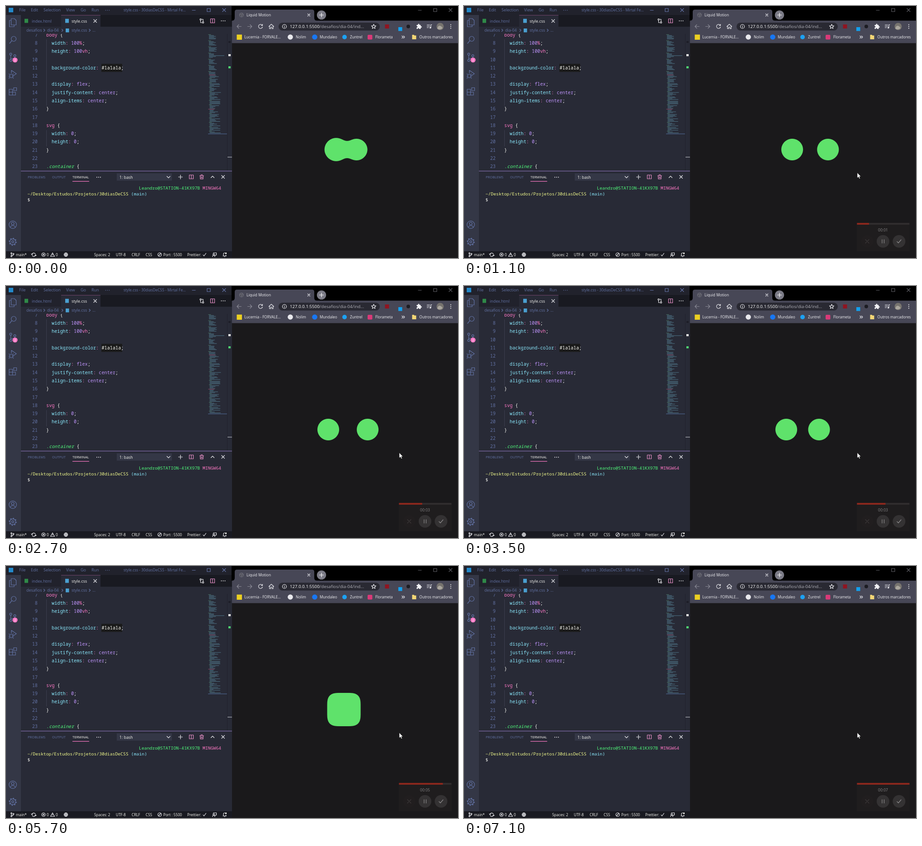
These frames come from a looping animation (1000x560 px, 7.2 s). An HTML page:

```html
<!DOCTYPE html>
<html lang="pt">
<head>
<meta charset="utf-8">
<title>Liquid Motion</title>
<style>
html, body { margin: 0; width: 100%; height: 100%; overflow: hidden; background: #000; }
svg { display: block; width: 1000px; height: 560px; }
text { font-family: "Open Sans", "Noto Sans", sans-serif; white-space: pre; }
.code text, .term text { font-family: "Noto Sans Mono", "DejaVu Sans Mono", monospace; font-weight: 500; fill: #f8f8f2; }
.code text { font-size: 10.22px; }
.code .num { fill: #6272a4; text-anchor: end; font-weight: 400; }
.term text { font-size: 9.8px; }
.code .pk, .term .pk { fill: #ff79c6; }
.code .cy, .term .cy { fill: #8be9fd; }
.code .pu { fill: #bd93f9; }
.code .gr, .term .gr { fill: #50fa7b; }
.term .ye { fill: #f1fa8c; }
.it { font-style: italic; }
.menu { font-size: 9px; fill: #6272a4; }
.tab { font-size: 8.9px; }
.panel { font-size: 7.6px; fill: #6272a4; }
.status { font-size: 8.2px; fill: #f8f8f2; }
.mark { font-size: 8.2px; fill: #f1f1f4; }
.ico { fill: none; stroke-width: 1.2; stroke-linecap: round; stroke-linejoin: round; }
.dim { stroke: #6272a4; }
.lit { stroke: #e8e8ec; }
.rose { stroke: #e58fc6; }

#left, #right, #box, #bar, #secs, #hud { animation: 7.2s infinite linear; }
#left { animation-name: left; }
#right { animation-name: right; }
#box { animation-name: box; transform-box: fill-box; transform: translate(-50%, -50%); }
#bar { animation-name: bar; }
#secs { animation-name: secs; animation-timing-function: step-end; }
#hud { animation-name: hud; animation-timing-function: step-end; }

@keyframes left {
  0% { transform: translateX(730.5px); r: 25.8px; }
  6.94% { transform: translateX(734px); r: 24px; animation-timing-function: ease-in-out; }
  26.4%, 48.6% { transform: translateX(713px); r: 24px; animation-timing-function: ease-in-out; }
  56% { transform: translateX(747.6px); r: 24px; }
  65%, 100% { transform: translateX(747.6px); r: 0px; }
}
@keyframes right {
  0% { transform: translateX(775.5px); }
  6.94% { transform: translateX(787.5px); animation-timing-function: ease-out; }
  27.8% { transform: translateX(818.5px); animation-timing-function: ease-in-out; }
  46%, 48.6% { transform: translateX(785.5px); r: 24px; animation-timing-function: ease-in-out; }
  56% { transform: translateX(747.6px); r: 24px; }
  65%, 100% { transform: translateX(747.6px); r: 0px; }
}
@keyframes box {
  0%, 54% { width: 0; height: 0; rx: 0px; }
  55.5% { width: 46px; height: 46px; rx: 23px; animation-timing-function: ease-out; }
  68.05% { width: 70.5px; height: 70.5px; rx: 27px; }
  79.2%, 87% { width: 71.4px; height: 71.4px; rx: 13px; animation-timing-function: ease-in; }
  96%, 100% { width: 0; height: 0; rx: 0px; }
}
@keyframes bar {
  0% { width: 9px; }
  6.94% { width: 17px; }
  27.8% { width: 41px; }
  48.6% { width: 63px; }
  68.05% { width: 86px; }
  79.2% { width: 97px; }
  98.6%, 100% { width: 116px; }
}
@keyframes secs {
  0% { transform: translateY(0); }
  21.9% { transform: translateY(-20px); }
  37.2% { transform: translateY(-40px); }
  52.6% { transform: translateY(-60px); }
  67.6% { transform: translateY(-80px); }
  83.3% { transform: translateY(-100px); }
  98%, 100% { transform: translateY(-120px); }
}
@keyframes hud {
  0% { opacity: 0; }
  2.7%, 100% { opacity: 1; }
}
</style>
</head>
<body>
<svg viewBox="0 0 1000 560">
<defs>
  <filter id="goo" filterUnits="userSpaceOnUse" x="640" y="240" width="250" height="160" color-interpolation-filters="sRGB">
    <feGaussianBlur stdDeviation="8"/>
    <feColorMatrix values="0 0 0 0 .373  0 0 0 0 .886  0 0 0 0 .42  0 0 0 20 -8.2"/>
  </filter>
  <clipPath id="codeClip"><rect x="33" y="62" width="467" height="304"/></clipPath>
  <clipPath id="secClip"><rect x="900" y="489" width="54" height="17"/></clipPath>
</defs>

<!-- editor -->
<rect width="500" height="560" fill="#282a36"/>
<rect width="500" height="20" fill="#21222c"/>
<rect y="20" width="33" height="525" fill="#343746"/>
<rect x="33" y="20" width="467" height="26" fill="#191a21"/>
<rect x="33" y="20" width="89" height="26" fill="#21222c"/>
<rect x="122" y="20" width="87" height="27" fill="#282a36"/>
<rect x="122" y="20" width="87" height="1" fill="#70446a"/>
<rect y="545" width="500" height="15" fill="#191a21"/>

<rect x="6" y="4" width="10" height="10" fill="#2489ca"/>
<g class="menu">
  <text x="29" y="12.3">File</text><text x="55" y="12.3">Edit</text><text x="83" y="12.3">Selection</text>
  <text x="133" y="12.3">View</text><text x="165" y="12.3">Go</text><text x="189" y="12.3">Run</text>
  <text x="260" y="12.3" font-size="8.4">style.css - 30diasDeCSS - Mirtal Fe...</text>
</g>
<g fill="#6272a4"><circle cx="220.500" cy="9.500" r=".8"/><circle cx="224.500" cy="9.500" r=".8"/><circle cx="228.500" cy="9.500" r=".8"/></g>
<path class="ico dim" d="M412 9.500h7M445 5.500h7v7h-7zM479 5.500l7 7m0-7l-7 7" stroke-width="1"/>

<rect x="41" y="28.500" width="8" height="9" fill="#2f8a48"/>
<text class="tab" x="57" y="36.500" fill="#6272a4">index.html</text>
<rect x="131" y="28.500" width="8" height="9" fill="#4a9fd0"/>
<text class="tab" x="145" y="36.500" fill="#f8f8f2">style.css</text>
<path class="ico lit" d="M194 30l6.500 6.500m0-6.500l-6.500 6.500"/>
<g class="ico lit"><circle cx="430.500" cy="30" r="1.600"/><circle cx="436" cy="36.500" r="1.600"/><path d="M430.500 32v5h3M436 34.500v-5h-3"/></g>
<path class="ico rose" d="M452.500 28.500h9v9h-9zM457 28.500v9"/>
<g fill="#e8e8ec"><circle cx="476.500" cy="33" r="1"/><circle cx="480.500" cy="33" r="1"/><circle cx="484.500" cy="33" r="1"/></g>
<g class="tab" fill="#6272a4">
  <text x="45" y="57.300">desafios</text><text x="91" y="57.300">dia-04</text>
  <text x="145" y="57.300">style.css</text><text x="191" y="57.300">...</text>
</g>
<path class="ico dim" d="M83.500 51.500l2.500 2.500-2.500 2.500M123.500 51.500l2.500 2.500-2.500 2.500M184 51.500l2.500 2.500-2.500 2.500" stroke-width="1"/>
<rect x="132" y="50" width="7.500" height="8.500" fill="#4a9fd0"/>

<!-- activity bar -->
<g class="ico dim" stroke-width="1.300">
  <path d="M11.500 28h7l4 4v10h-11zM11.500 32h-4v14h10.500v-4"/>
  <circle cx="17" cy="73" r="5.500"/><path d="M13 77l-5 6"/>
  <circle cx="10.500" cy="107" r="2.300"/><circle cx="10.500" cy="121" r="2.300"/><circle cx="19.500" cy="110.500" r="2.300"/><path d="M10.500 109.500v9M19.500 113q0 3.500-4 3.500h-2.500q-2.500 0-2.500 2"/>
  <path d="M12 143l11 7.500-7 4.500M12 143v6"/><ellipse cx="11.500" cy="155.500" rx="3.300" ry="4"/><path d="M8 152l-1.500-1M15 152l1.500-1M7.500 156h-1.500M17 156h-1.500M8 159l-1.500 1.500M15 159l1.500 1.500"/>
  <path d="M7 185h7.500v13h-7.500zM7 191.500h14v6.500h-7M17 181.500h6.500v6.500h-6.500z"/>
  <circle cx="15" cy="486" r="8.300"/><circle cx="15" cy="483.500" r="3"/><path d="M9.500 492q1-4 5.500-4t5.500 4"/>
  <circle cx="15" cy="524" r="6.300"/><circle cx="15" cy="524" r="2.300"/><circle cx="15" cy="524" r="7.600" stroke-width="2.200" stroke-dasharray="2.500 3.470" stroke-linecap="butt"/>
</g>
<circle cx="20" cy="120" r="5.600" fill="#ff79c6"/>
<text x="20" y="122.600" font-size="7" fill="#fff" text-anchor="middle">2</text>

<!-- code -->
<g class="code" clip-path="url(#codeClip)">
  <path d="M89.500 74v148M89.500 276v36" stroke="#3b3e4e"/>
  <rect x="211" y="128.500" width="46" height="18" fill="#1a1a1a"/>
  <g id="nums"></g>
  <text x="89" y="67.700"><tspan class="pk">body</tspan> {</text>
  <text x="101" y="86"><tspan class="cy">width</tspan><tspan class="pk">:</tspan> <tspan class="pu">100</tspan><tspan class="pk">%</tspan>;</text>
  <text x="101" y="104.300"><tspan class="cy">height</tspan><tspan class="pk">:</tspan> <tspan class="pu">100</tspan><tspan class="pk">vh</tspan>;</text>
  <text x="101" y="140.800"><tspan class="cy">background-color</tspan><tspan class="pk">:</tspan> #1a1a1a;</text>
  <text x="101" y="177.400"><tspan class="cy">display</tspan><tspan class="pk">:</tspan> <tspan class="pu">flex</tspan>;</text>
  <text x="101" y="195.700"><tspan class="cy">justify-content</tspan><tspan class="pk">:</tspan> <tspan class="pu">center</tspan>;</text>
  <text x="101" y="214"><tspan class="cy">align-items</tspan><tspan class="pk">:</tspan> <tspan class="pu">center</tspan>;</text>
  <text x="89" y="232.200">}</text>
  <text x="89" y="268.800"><tspan class="pk">svg</tspan> {</text>
  <text x="101" y="287.100"><tspan class="cy">width</tspan><tspan class="pk">:</tspan> <tspan class="pu">0</tspan>;</text>
  <text x="101" y="305.400"><tspan class="cy">height</tspan><tspan class="pk">:</tspan> <tspan class="pu">0</tspan>;</text>
  <text x="89" y="323.600">}</text>
  <text x="89" y="360.200"><tspan class="gr it">.container</tspan> {</text>
</g>
<g id="map" opacity=".7"></g>
<rect x="447" y="283.500" width="42" height="1.500" fill="#44597c"/>
<path d="M489.500 62v304" stroke="#20212b"/>
<rect x="492" y="78" width="5" height="4" fill="#1d1e27"/>
<rect x="492" y="107" width="5" height="4.500" fill="#f8f8f2"/>
<rect x="492" y="134" width="5" height="4.500" fill="#4fd873"/>
<rect x="490" y="335" width="10" height="1.500" fill="#9a9ba3"/>

<!-- terminal -->
<rect x="33" y="366.200" width="467" height="1.200" fill="#8570b0"/>
<g class="panel">
  <text x="48" y="383">PROBLEMS</text><text x="102" y="383">OUTPUT</text><text x="147" y="383" fill="#f8f8f2">TERMINAL</text>
</g>
<rect x="147" y="389" width="37" height="1.200" fill="#ff79c6"/>
<g fill="#e8e8ec"><circle cx="201" cy="380.500" r="1"/><circle cx="205" cy="380.500" r="1"/><circle cx="209" cy="380.500" r="1"/></g>
<rect x="245" y="372" width="122" height="16" fill="#343746"/>
<text class="tab" x="251" y="383.500" fill="#f8f8f2">1: bash</text>
<path class="ico lit" d="M356 378.500l3.500 3.500 3.500-3.500M381.500 380h9M386 375.500v9M453.500 381.500l3.500-3.500 3.500 3.500M477 376.500l6.500 6.500m0-6.500l-6.500 6.500"/>
<path class="ico rose" d="M405.500 375.500h9v8.500h-9zM410 375.500v8.500M428.500 377h9M431.500 376.500v-1.500h3v1.500M429.500 377.500l.500 7h6l.500-7M432 379.500v3M434 379.500v3"/>
<g class="term">
  <text x="294" y="407.500"><tspan class="gr">Leandro@STATION-41KX97B</tspan> <tspan class="pk">MINGW64</tspan></text>
  <text x="47.500" y="420.500"><tspan class="ye">~/Desktop/Estudos/Projetos/30diasDeCSS</tspan> <tspan class="cy">(main)</tspan></text>
  <text x="47.500" y="433.500">$</text>
</g>

<!-- status bar -->
<g class="status">
  <text x="22" y="556">main*</text><text x="90" y="556">0</text><text x="110" y="556">0</text>
  <text x="195" y="556">Spaces: 2</text><text x="243" y="556">UTF-8</text><text x="278" y="556">CRLF</text>
  <text x="309" y="556">CSS</text><text x="348" y="556">Port : 5500</text><text x="401" y="556">Prettier:</text>
</g>
<g class="ico lit" stroke-width="1">
  <circle cx="12" cy="549.500" r="1.300"/><circle cx="12" cy="556" r="1.300"/><circle cx="16.500" cy="551" r="1.300"/><path d="M12 551v3.500M16.500 552.500q0 2-4.500 2"/>
  <path d="M57.500 552a4 4 0 0 1 7.500-1M65.500 553.500a4 4 0 0 1-7.500 1M56 551l1.500 1.500 1.500-1.500M64 554.500l1.500-1.500 1.500 1.500"/>
  <circle cx="83" cy="552.500" r="4"/><path d="M81.500 551l3 3m0-3l-3 3M103 548.500l4.500 8h-9zM103 551.500v2"/>
  <circle cx="132.500" cy="552.500" r="4"/><path d="M128.500 552.500h8M132.500 548.500v8"/><ellipse cx="132.500" cy="552.500" rx="2" ry="4"/>
  <circle cx="340" cy="552.500" r="4"/><path d="M337.500 555.500l5-6M436 553l2 2.500 4.500-6"/>
  <circle cx="459.500" cy="552" r="1.700"/><path d="M457 557q0-3 2.500-3t2.500 3M458.500 548.500h7v5h-2l-1.500 1.500"/>
  <path d="M480 555.500h7.500M481 555v-3.500q0-3 3-3M486.500 555v-2M483 557h1.500"/>
</g>
<circle cx="486.500" cy="549.500" r="1.800" fill="#f8f8f2"/>

<!-- browser -->
<rect x="500" width="500" height="560" fill="#1a191b"/>
<rect x="499" width="501" height="33" fill="#000"/>
<path d="M500 32.500q6 0 6-6V13q0-5 5-5h166q5 0 5 5v13.500q0 6 6 6h312v50H500z" fill="#474756"/>
<g class="ico" stroke="#6c6c78"><circle cx="521" cy="20" r="4.500" fill="#50505a"/><path d="M517 18.500h3l2 2-1 3.500M523 16v2l2 1.500"/></g>
<text x="532" y="23" font-size="8.400" fill="#f1f1f4">Liquid Motion</text>
<path class="ico lit" d="M667.500 17.500l5 5m0-5l-5 5"/>
<circle cx="698" cy="20" r="10.300" fill="#7a7a85"/>
<path class="ico" stroke="#fff" d="M693.500 20h9M698 15.500v9"/>
<path class="ico" stroke="#5a5a60" stroke-width="1" d="M912 9.500h7M946 5.500h7v7h-7zM980 5.500l7 7m0-7l-7 7"/>
<rect x="603" y="37" width="224" height="17.500" rx="8.700" fill="#292932"/>
<path class="ico" stroke="#8a8a95" d="M520.500 45.500h-9M515 41.500l-4 4 4 4M534.500 45.500h9M540 41.500l4 4-4 4" stroke-width="1.400"/>
<g class="ico lit" stroke-width="1.400">
  <path d="M567 43a4.500 4.500 0 1 0 .500 3.500M567.500 40.500v3h-3"/>
  <path d="M581.500 45.500l5.500-5 5.500 5M583 44.500v6h2.500v-3.500h3v3.500h2.500v-6"/>
</g>
<g class="ico lit" stroke-width="1"><circle cx="616" cy="45.500" r="4.500"/><path d="M616 45v3M616 43v.200"/>
<path d="M813.500 40.500l1.400 3.400 3.600.300-2.800 2.300.900 3.600-3.100-2-3.100 2 .900-3.600-2.800-2.300 3.600-.300z"/></g>
<text x="628" y="49" font-size="9.700" fill="#fff">127.0.0.1:5500<tspan fill="#b0b0b8">/desafios/dia-04/ind...</tspan></text>
<rect x="838.500" y="41" width="9" height="9" fill="#8f1420"/>
<rect x="868" y="47" width="8.500" height="8.500" fill="#12a0ee"/>
<circle cx="890" cy="45.500" r="4" fill="#1c1c22"/>
<path d="M908.500 42h3q-.500-2.500 1.500-2.500t1.500 2.500h3v3q2.500-.300 2.500 1.500t-2.500 1.500v3h-3.500q0-2-1.500-2t-1.500 2h-2.500v-3.500q2 0 2-1.500t-2-1.500z" fill="#f1f1f4"/>
<path class="ico lit" d="M931.500 42h6M931.500 45h6M931.500 48h3.500M940 48v-6.500h2"/><circle cx="938.800" cy="48.300" r="1.700" fill="#e8e8ec"/>
<circle cx="960.500" cy="45.500" r="8" fill="#77746f"/><path d="M954 50q2-7 6-6t6 5a8 8 0 0 1-12 1z" fill="#aaa69e"/>
<g fill="#e8e8ec"><circle cx="984" cy="41.500" r="1.100"/><circle cx="984" cy="45.500" r="1.100"/><circle cx="984" cy="49.500" r="1.100"/></g>
<rect x="510.500" y="63.500" width="11.500" height="11.500" fill="#ecd021"/>
<circle cx="629" cy="69" r="5.800" fill="#e8e8ec"/>
<circle cx="683" cy="69" r="5.800" fill="#1877f2"/>
<circle cx="749" cy="69" r="5" fill="#1da1f2"/>
<rect x="800" y="64" width="10.500" height="10.500" rx="2" fill="#d93a78"/>
<path d="M898.500 64h4l1 1.500h4v8.500h-9z" fill="#f2d675"/>
<g class="mark">
  <text x="527.500" y="72">Lucernia - FORVALE...</text><text x="641" y="72">Nolim</text><text x="694" y="72">Mundaleo</text>
  <text x="761" y="72">Zuntrel</text><text x="817" y="72">Florameta</text><text x="914.500" y="72">Outros marcadores</text>
</g>
<path class="ico lit" d="M876 66.500l2.500 2.500-2.500 2.500M879.500 66.500l2.500 2.500-2.500 2.500"/>

<!-- liquid -->
<g filter="url(#goo)" fill="#5fe26b">
  <circle id="left" cy="319" r="24"/>
  <circle id="right" cy="319" r="24"/>
  <rect id="box" x="747.600" y="319"/>
</g>

<!-- recorder and pointer -->
<g id="hud">
  <rect x="869" y="482" width="117" height="63" fill="#1f1d1e"/>
  <rect x="869.500" y="482" width="116" height="4" fill="#302d2e"/>
  <rect id="bar" x="869.500" y="482" height="4" fill="#8a271d"/>
  <g clip-path="url(#secClip)"><g id="secs" font-size="8.600" fill="#858384" text-anchor="middle"></g></g>
  <circle cx="892" cy="523" r="14" fill="#211e1f"/>
  <circle cx="927" cy="523" r="14" fill="#343233"/><circle cx="962.500" cy="523" r="14" fill="#343233"/>
  <path class="ico" stroke="#3c3839" d="M888 519l8 8m0-8l-8 8"/>
  <path class="ico" stroke="#8d8b8c" d="M925 519v8M929.500 519v8M958 523.500l3 3 6-7" stroke-width="1.400"/>
  <path d="M870 370.500v11.800l2.700-2.500 1.900 4.200 1.900-.900-1.900-4h3.600z" fill="#fff" stroke="#111" stroke-width=".6"/>
</g>
</svg>
<script>
const NS = "http://www.w3.org/2000/svg";
function add(parent, tag, attrs, text = "") {
  const el = document.createElementNS(NS, tag);
  for (const k in attrs) el.setAttribute(k, attrs[k]);
  el.textContent = text;
  document.getElementById(parent).append(el);
}

for (let n = 7; n <= 23; n++) add("nums", "text", { class: "num", x: 70, y: 86 + 18.28 * (n - 8) }, n);
for (let s = 1; s <= 7; s++) add("secs", "text", { x: 927, y: 501 + 20 * (s - 1) }, "00:0" + s);

// Minimap: short rule blocks, then nested keyframe-like blocks.
let seed = 7;
const rnd = () => (seed = seed * 16807 % 2147483647) / 2147483647;
for (let y = 63, i = 0; y < 282; y += 1.95, i++) {
  const nested = y > 152, size = nested ? 5 : 7, row = i % size;
  if (!nested && row === size - 1) continue;
  const head = row === 0;
  const heading = Math.abs(y - 153) < 1 || Math.abs(y - 229) < 1;
  const x = heading || !nested ? (head ? 447.5 : 449) : (head ? 449 : 450.5);
  const wide = !nested && rnd() > 0.93 ? 34 : head ? 6 : 8 + rnd() * (nested ? 17 : 10);
  add("map", "rect", {
    x, y, width: heading ? 14 : wide, height: 1,
    fill: heading ? "#c4587f" : head ? "#5c9c80" : "#5f93a8"
  });
}
</script>
</body>
</html>
```
